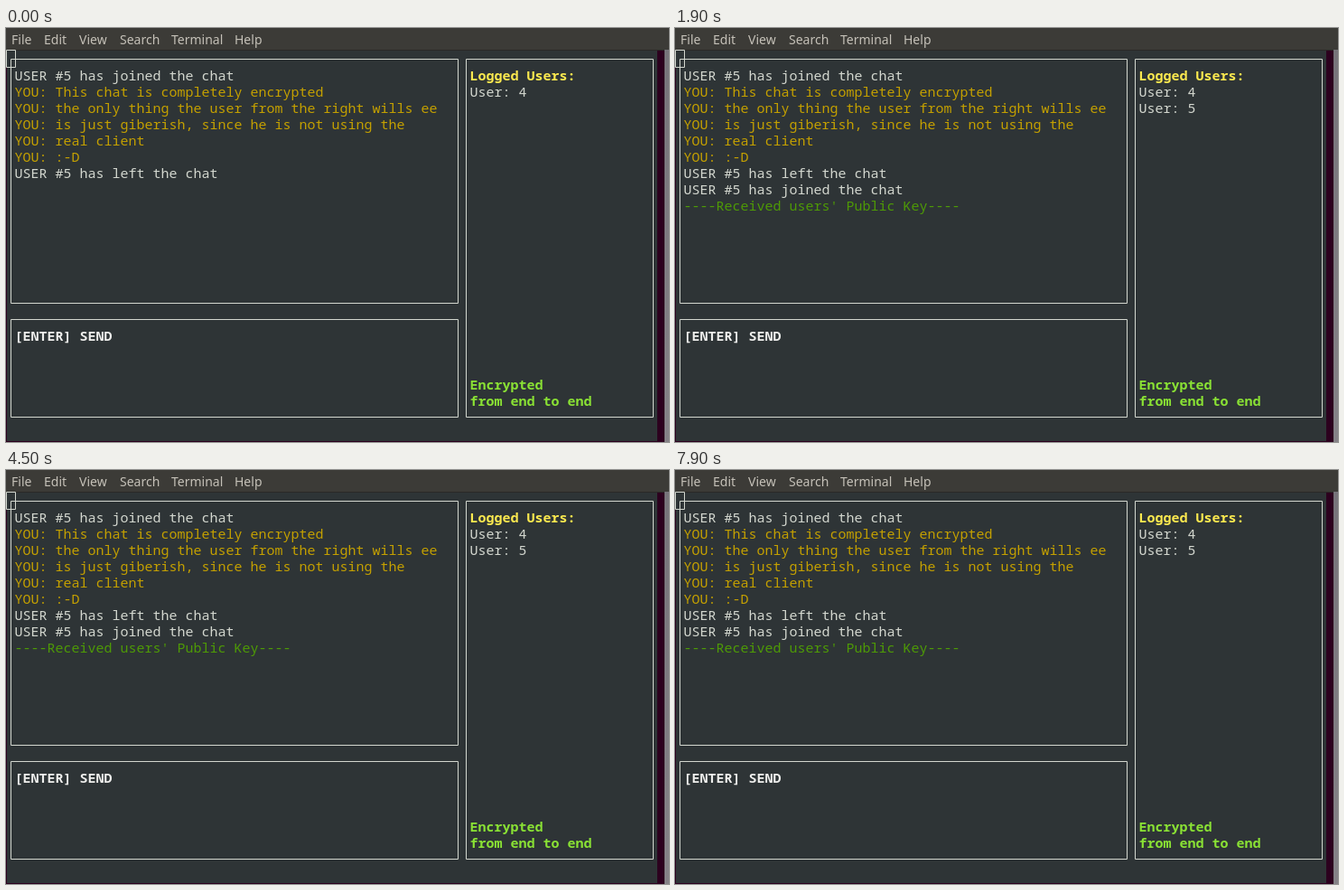
These frames come from a looping animation (734x458 px, 8000 ms). An HTML page:

```html
<!DOCTYPE html>
<html lang="en">
<head>
<meta charset="utf-8">
<title>Encrypted chat</title>
<style>
html, body { margin: 0; width: 100%; height: 100%; overflow: hidden; background: #2e3436; }
svg { display: block; }
text { font: 15px "Noto Sans Mono", "DejaVu Sans Mono", monospace; fill: #d3d7cf; }
.menu text { font: 14px "Noto Sans", "Open Sans", sans-serif; fill: #c5c1b8; }
.you { fill: #c4a000; }
.key { fill: #4e9a06; }
.bold { font-weight: bold; fill: #eeeeec; }
.title { fill: #fce94f; }
.safe { fill: #8ae234; }
.line { fill: none; stroke: #d3d7cf; }
</style>
</head>
<body>
<svg width="734" height="458" viewBox="0 0 734 458">
  <defs>
    <linearGradient id="edge" x2="0" y2="1">
      <stop stop-color="#77747a"/>
      <stop offset="1" stop-color="#858287"/>
    </linearGradient>
  </defs>
  <rect width="734" height="458" fill="#2c001e"/>
  <rect x="1" y="24" width="720" height="433" fill="#2e3436"/>
  <rect x="729" y="24" width="5" height="434" fill="url(#edge)"/>
  <rect width="734" height="24" fill="#3c3b37"/>
  <path d="M0 24.5H729" stroke="#2b2927"/>
  <g class="menu">
    <text x="6" y="18">File</text>
    <text x="42" y="18">Edit</text>
    <text x="81" y="18">View</text>
    <text x="126" y="18">Search</text>
    <text x="183" y="18">Terminal</text>
    <text x="253" y="18">Help</text>
  </g>
  <path class="line" d="M5.5 34.5h495v270h-495zM5.5 322.5h495v108h-495zM509.5 34.5h207v396h-207zM.5 24.5h10v19h-10z"/>
  <g id="screen"></g>
  <g id="joined"></g>
</svg>
<script>
const LOOP = 8000, JOIN = 1900;
const screen = document.getElementById("screen");
const joined = document.getElementById("joined");

// Rows are 18 px terminal lines, counted from the top of the panels.
function write(parent, x, row, string, style = "") {
  const node = document.createElementNS("http://www.w3.org/2000/svg", "text");
  node.setAttribute("x", x);
  node.setAttribute("y", 58 + row * 18);
  node.setAttribute("class", style);
  node.textContent = string;
  parent.append(node);
}

write(screen, 9.5, 0, "USER #5 has joined the chat");
[
  "This chat is completely encrypted",
  "the only thing the user from the right wills ee",
  "is just giberish, since he is not using the",
  "real client",
  ":-D"
].forEach((message, i) => write(screen, 9.5, i + 1, "YOU: " + message, "you"));
write(screen, 9.5, 6, "USER #5 has left the chat");
write(screen, 9.5, 16, "[ENTER] SEND", "bold");
write(screen, 513.5, 0, "Logged Users:", "bold title");
write(screen, 513.5, 1, "User: 4");
write(screen, 513.5, 19, "Encrypted", "bold safe");
write(screen, 513.5, 20, "from end to end", "bold safe");

write(joined, 9.5, 7, "USER #5 has joined the chat");
write(joined, 9.5, 8, "----Received users' Public Key----", "key");
write(joined, 513.5, 2, "User: 5");

const start = performance.now();
function draw() {
  const time = (performance.now() - start) % LOOP;
  joined.setAttribute("visibility", time < JOIN ? "hidden" : "visible");
  requestAnimationFrame(draw);
}
draw();
</script>
</body>
</html>
```
